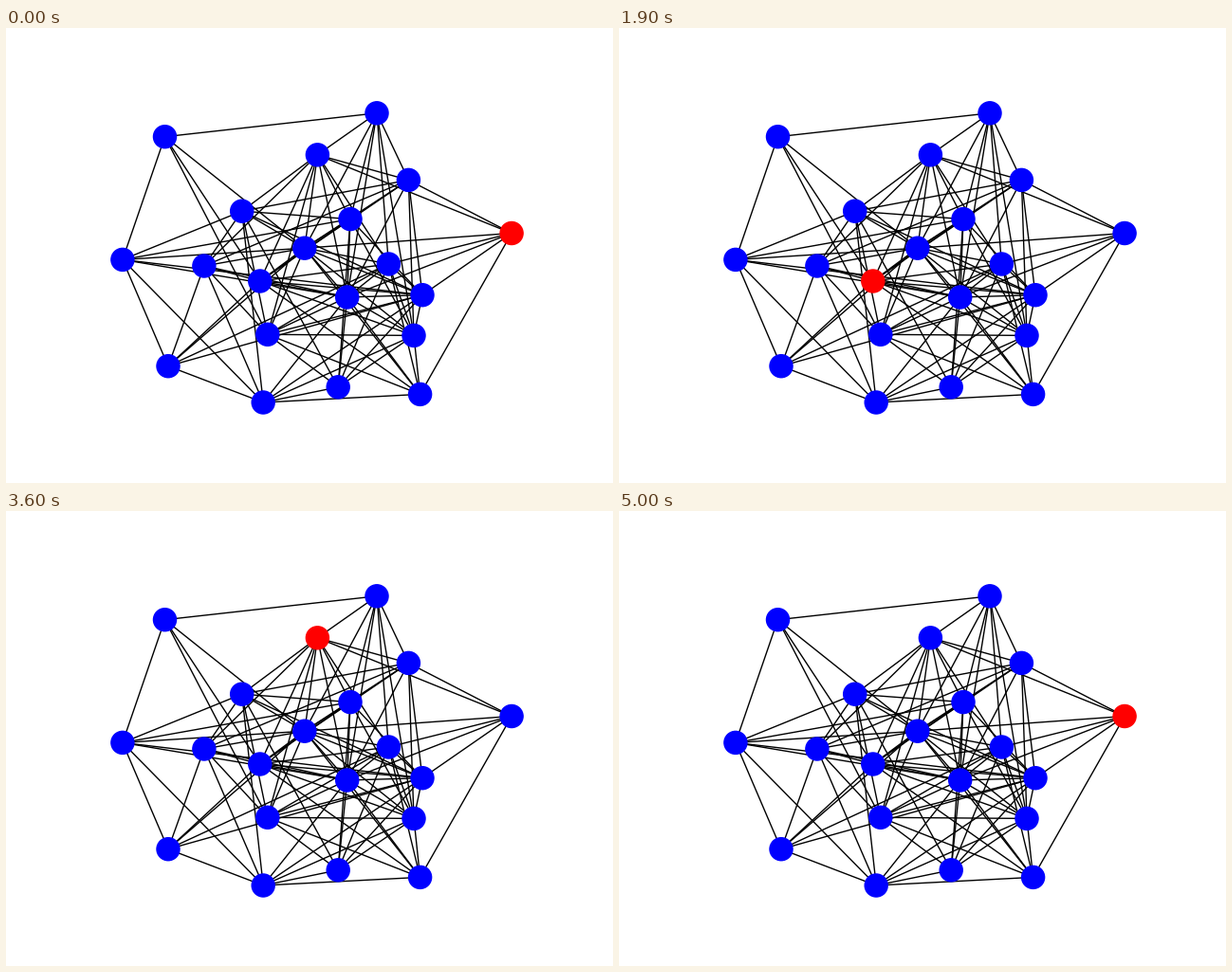
These frames come from a looping animation (640 px wide and 480 px high, 5.1 s). A matplotlib script:

```python
import matplotlib.pyplot as plt
from matplotlib.animation import FuncAnimation
from matplotlib.collections import LineCollection

# Node centres in pixels, y pointing down
NODES = {
    "A": (167.5, 114.7), "B": (391, 89.8), "C": (328.4, 133.8), "D": (424.4, 160.4),
    "E": (533.1, 216.5), "F": (248.7, 193.2), "G": (363, 201.6), "H": (314.8, 232.2),
    "I": (122.9, 244.4), "J": (208.9, 251), "K": (267.8, 267), "L": (403.4, 249),
    "M": (439, 281.7), "N": (359.7, 284), "O": (275.8, 323.3), "P": (430, 324.4),
    "Q": (171, 356.7), "R": (271.2, 395), "S": (350.2, 378.8), "T": (436.6, 386.4),
}

# Each edge is listed once, under its alphabetically first end
LINKS = {
    "A": "BIHKO", "B": "CDGHLNP", "C": "DEFGHJKLNO", "D": "EFHJKMNP",
    "E": "HLMNT", "F": "GHIJMORS", "G": "HIKMNPS", "H": "IJKLMNOPQT",
    "I": "MNQR", "J": "KNOQR", "K": "LMNPQT", "L": "MNOPQST",
    "M": "NOPQRS", "N": "OPRST", "O": "PST", "P": "RST", "Q": "R", "R": "ST",
}

# Node highlighted at each tick
WALK = "EEDHPNMELGFJKKSRPOTKFJIQNCHTMDGSLPFOCBNRJDHAKGMOLTE"

fig = plt.figure(figsize=(6.4, 4.8), dpi=100, facecolor="white")
ax = fig.add_axes([0, 0, 1, 1])
ax.set(xlim=(0, 640), ylim=(480, 0))
ax.axis("off")

segments = [(NODES[a], NODES[b]) for a, ends in LINKS.items() for b in ends]
ax.add_collection(LineCollection(segments, colors="black", linewidths=1, zorder=1))
dots = ax.scatter(*zip(*NODES.values()), s=300, c="blue", linewidths=1, zorder=2)


def update(tick):
    colors = ["red" if name == WALK[tick] else "blue" for name in NODES]
    dots.set_facecolor(colors)
    dots.set_edgecolor(colors)
    return (dots,)


anim = FuncAnimation(fig, update, frames=len(WALK), interval=100, repeat=True)
plt.show()
```
